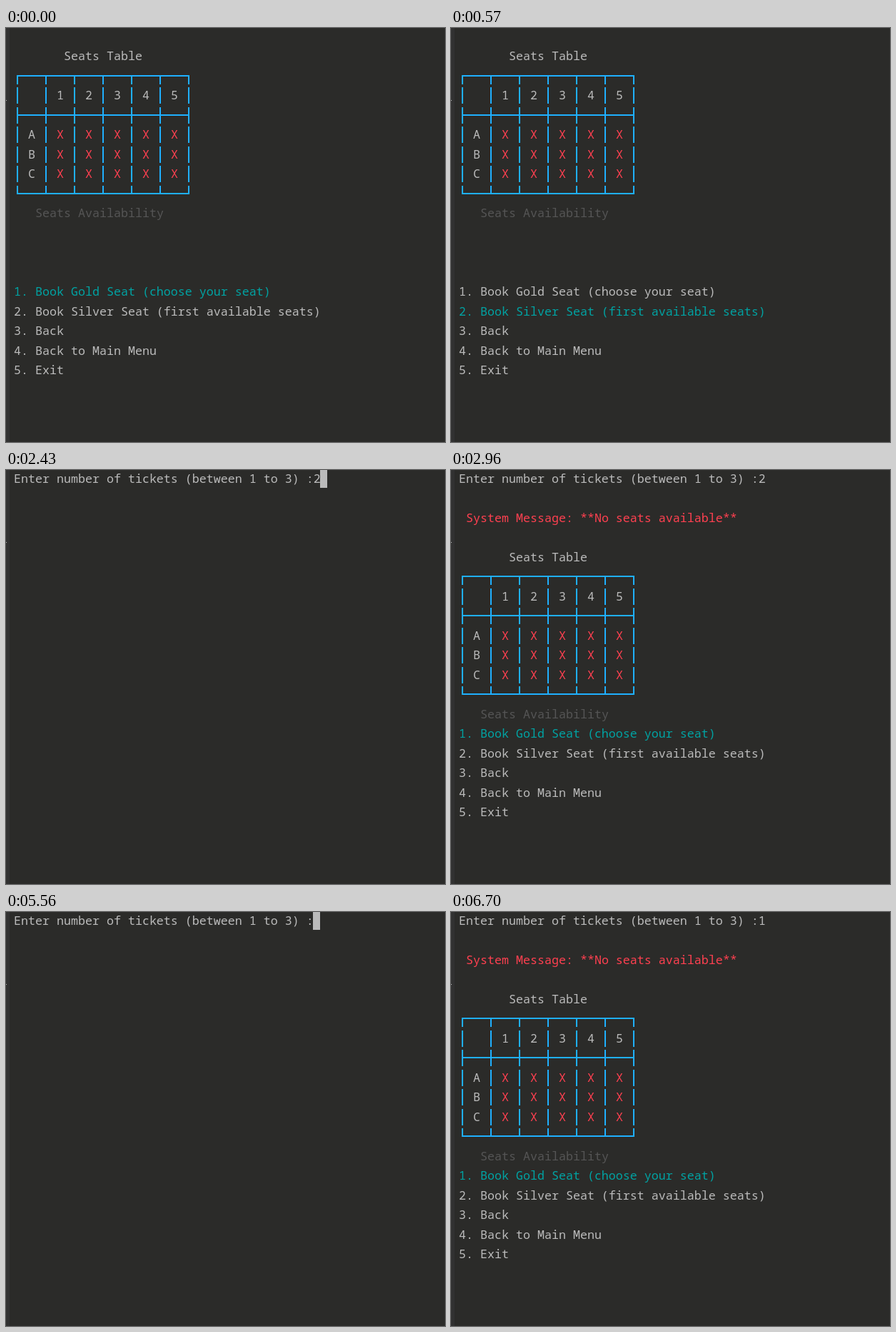
These frames come from a looping animation (615x580 px, 8 s). An HTML page with a canvas:

```html
<!DOCTYPE html>
<html lang="en">
<head>
<meta charset="utf-8">
<title>Seat booking terminal</title>
<style>
html, body { margin: 0; width: 100%; height: 100%; overflow: hidden; background: #2b2b29; }
canvas { display: block; }
</style>
</head>
<body>
<canvas id="stage" width="615" height="580"></canvas>
<script>
const ctx = document.getElementById('stage').getContext('2d');
const LOOP = 8000;
const LEFT = 11, CELL = 10, ROW = 27.5;
const COLOR = {
  back: '#2b2b29', gutter: '#313131', text: '#bbbbbb', dim: '#555555',
  red: '#ff4050', cyan: '#00a3a3', blue: '#1fb0ff'
};
const PROMPT = 'Enter number of tickets (between 1 to 3) :';
const MENU = [
  '1. Book Gold Seat (choose your seat)',
  '2. Book Silver Seat (first available seats)',
  '3. Back',
  '4. Back to Main Menu',
  '5. Exit'
];

// Screen states; each lasts until the next one starts.
const menu = (at, selected) => ({ at, table: 1, selected });
const prompt = (at, typed, cursor) => ({ at, typed, cursor });
const result = (at, typed, selected) => ({ at, typed, message: true, table: 4, selected });
const STATES = [
  menu(0, 0),
  menu(500),
  menu(570, 1),
  prompt(2030, ''),
  prompt(2090, '', 42),
  prompt(2430, '2', 43),
  result(2960, '2', 0),
  menu(4630, 1),
  prompt(5560, '', 42),
  prompt(6090, '1'),
  prompt(6170, '1', 43),
  result(6630, '1'),
  result(6700, '1', 0)
];

const rowTop = row => Math.floor(row * ROW);

function rect(color, x, y, w, h) {
  ctx.fillStyle = color;
  ctx.fillRect(x, y, w, h);
}

function write(text, col, row, color = COLOR.text) {
  ctx.fillStyle = color;
  ctx.fillText(text, LEFT + col * CELL, 18 + rowTop(row));
}

function drawTable(top) {
  write('Seats Table', 7, top);
  // Border rows 1, 3 and 7 carry rules; bars in every row leave small gaps.
  for (let r = 1; r <= 7; r++) {
    const y = rowTop(top + r);
    if (r === 1 || r === 3 || r === 7) rect(COLOR.blue, 15, y + 11, 242, 2);
    const start = r === 1 ? 11 : 1;
    const end = r === 7 ? 13 : 24;
    for (let c = 0; c <= 6; c++) rect(COLOR.blue, 15 + c * 40, y + start, 2, end - start);
  }
  for (let c = 1; c <= 5; c++) write(String(c), 2 + c * 4, top + 2);
  ['A', 'B', 'C'].forEach((name, i) => {
    write(name, 2, top + 4 + i);
    for (let c = 1; c <= 5; c++) write('X', 2 + c * 4, top + 4 + i, COLOR.red);
  });
  write('Seats Availability', 3, top + 8, COLOR.dim);
}

function draw(state) {
  rect(COLOR.back, 0, 0, 615, 580);
  rect(COLOR.gutter, 0, 0, 5, 580);
  rect(COLOR.text, 0, 101, 1, 1);
  if (state.typed !== undefined) write(PROMPT + state.typed, 0, 0);
  if (state.cursor) rect(COLOR.text, LEFT - 1 + state.cursor * CELL, 0, CELL, 25);
  if (state.message) write('System Message: **No seats available**', 1, 2, COLOR.red);
  if (state.table) drawTable(state.table);
  if (state.selected !== undefined) {
    MENU.forEach((item, i) =>
      write(item, 0, 13 + i, i === state.selected ? COLOR.cyan : COLOR.text));
  }
}

ctx.font = '16.667px "Noto Sans Mono", "DejaVu Sans Mono", monospace';
ctx.textBaseline = 'alphabetic';
const began = performance.now();

function tick() {
  const time = (performance.now() - began) % LOOP;
  draw(STATES.filter(state => state.at <= time).pop());
  requestAnimationFrame(tick);
}
tick();
</script>
</body>
</html>
```
